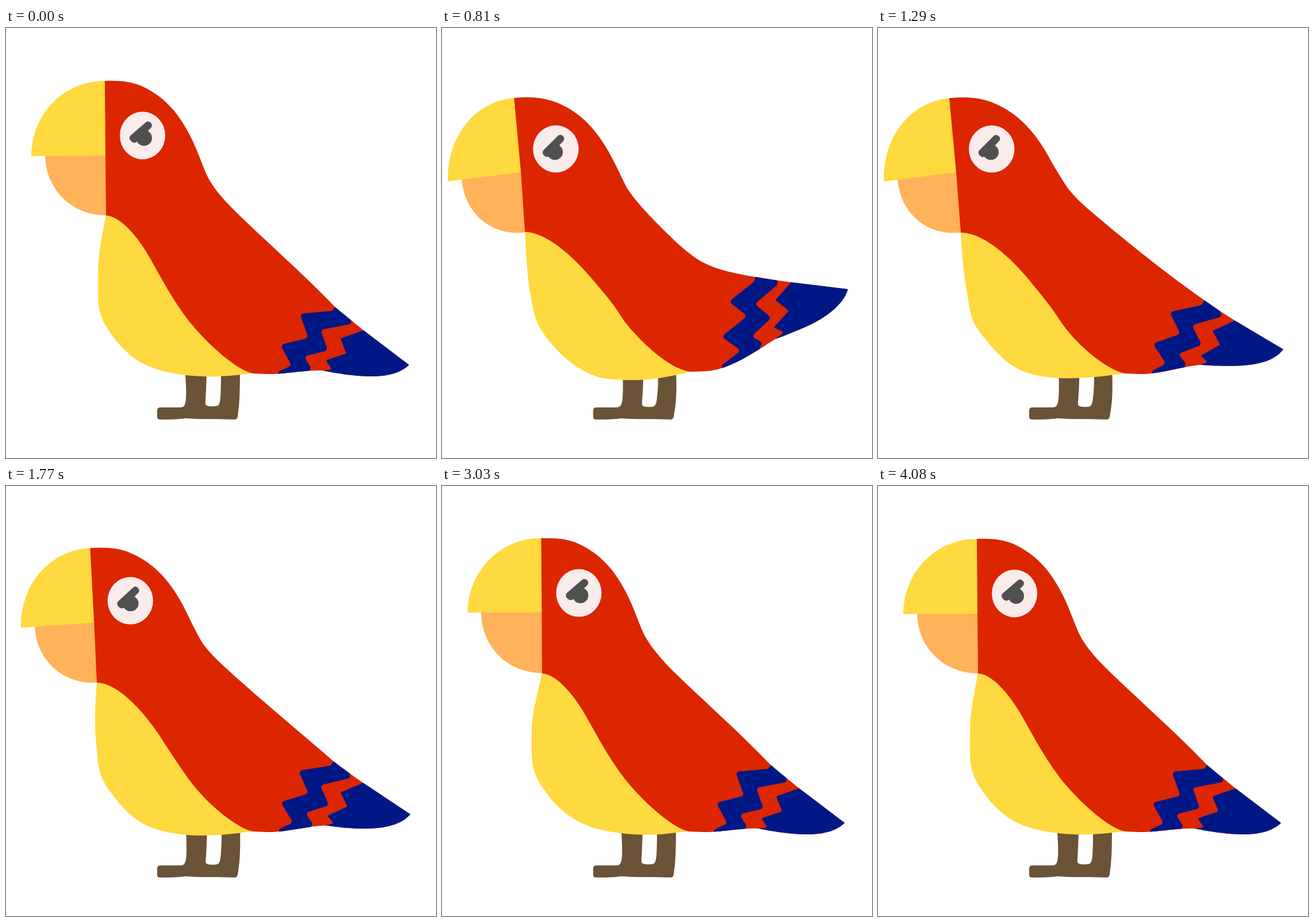
An HTML page with a canvas that plays this animation: 748x748 px, repeating every 4.8 s.

```html
<!DOCTYPE html>
<html lang="en">
<head>
<meta charset="utf-8">
<title>Parrot</title>
<style>
  html, body { margin: 0; width: 100%; height: 100%; overflow: hidden; background: #fff; }
  canvas { display: block; }
</style>
</head>
<body>
<canvas id="stage" width="748" height="748"></canvas>
<script>
const ctx = document.getElementById('stage').getContext('2d');
const LOOP = 4800, STEP = 30;
const BLUE = '#001885', YELLOW = '#ffd940', GREY = '#505050';

// Poses of each part: rest, crouch (head down), wag (head down, tail up), breath.
const legs = {
  color: '#6b5338',
  rest: 'M311,590 C313,615 314,635 313,645 C312,656 310,660 303,660 L268,660 Q263,660 263,666 L263,677 Q263,681 268,681 C285,681 295,681 312,679 C335,681 370,680 398,681 Q402,681 403,676 C406,655 407,640 407,590 L374,590 C374,610 374,630 373,643 C372,654 370,658 364,658 Q347,659 347,654 C347,645 349,620 349,590 Z',
  crouch: 'M314,590 C315,615 315,635 314,645 C313,656 310,660 303,660 L268,660 Q263,660 263,666 L263,677 Q263,681 268,681 C285,681 295,681 312,679 C335,681 370,680 398,681 Q402,681 403,676 C407,655 409,640 407,590 L376,590 C376,610 376,630 374,643 C373,654 371,659 365,659 Q348,660 348,655 C348,645 351,620 350,590 Z'
};
const belly = {
  color: YELLOW,
  rest: 'M174,326 C166,365 160,395 160,430 L160,460 C160,490 165,505 178,525 C205,567 237,590 283,599 C310,605 340,607 370,606 C395,605 415,602 435,600 L400,450 L200,300 Z',
  crouch: 'M144,356 C146,390 148,420 153,450 L158,480 C162,510 172,524 190,545 C220,582 240,595 271,603 C297,609 320,610 345,609 C380,608 405,604 435,600 L400,450 L180,330 Z',
  wag: 'M144,355 C146,390 148,430 153,460 L157,482 C162,512 172,527 190,549 C216,580 245,600 275,608 C300,613 325,613 350,612 C380,610 407,604 437,597 L400,450 L180,330 Z',
  breath: 'M174,325 C165,365 153,395 153,430 L153,460 C153,490 160,505 173,525 C200,564 235,590 283,600 C310,605 340,608 370,607 C395,605 415,602 435,600 L400,450 L200,300 Z'
};
const jaw = {
  color: '#ffb259',
  rest: 'M68,220 C68,281 115,326 174,326 L176,322 L175,220 Z',
  crouch: 'M34,262 C38,322 85,362 143,356 L146,352 L138,248 Z',
  breath: 'M68,217 C68,280 115,325 174,325 L176,320 L175,216 Z'
};
const beak = {
  color: YELLOW,
  rest: 'M174,92 L172,92 C100,92 44,150 44,223 L175,222 Z',
  crouch: 'M126,122 L124,122 C60,128 8,185 10,267 L138,251 Z',
  breath: 'M175,90 L173,90 C101,90 46,147 45,218 L176,218 Z'
};
const body = {
  color: '#dc2600',
  rest: 'M172,92 C200,91 222,94 238,102 C272,118 300,144 325,197 C340,230 345,250 356,268 C366,284 376,296 394,314 C440,360 520,430 572,485 C590,500 606,513 622,526 L701,586 C690,597 670,606 637,606 C610,606 575,601 552,596 C525,594 480,603 455,602 L430,601 C405,597 355,555 320,512 C290,473 270,435 252,403 C235,372 203,328 174,326 L173,222 Z',
  crouch: 'M124,122 C152,119 175,121 195,128 C235,143 265,170 292,215 C308,244 320,264 332,281 C350,304 378,325 400,344 C470,402 520,440 567,473 C585,486 603,498 621,509 L705,559 C694,574 670,588 613,588 C595,588 575,587 560,586 C530,589 485,603 455,602 L430,601 C405,597 352,560 318,511 C305,490 288,469 274,452 C245,414 190,356 144,356 L136,251 Z',
  wag: 'M125,122 C153,119 175,121 197,129 C236,144 264,171 289,214 C305,243 313,262 322,279 C338,304 373,340 412,377 C445,405 460,419 545,433 C566,436 587,440 607,442 L706,454 C700,480 665,508 620,525 C604,531 592,537 580,541 C545,563 500,595 460,597 L435,598 C405,597 358,560 322,516 C308,498 303,485 274,452 C245,416 190,356 144,355 L137,251 Z'
};
const stripe = {
  color: BLUE, corner: 5,
  rest: '574,482 568,492 511,497 526,539 477,551 497,587 455,606 520,606 531,592 518,571 560,561 547,525 601,515 599,500',
  crouch: '569,470 563,482 507,494 526,532 478,549 501,584 462,604 525,606 536,584 522,567 563,551 546,517 598,502 594,488',
  wag: '546,428 543,441 499,476 531,501 486,537 520,561 475,596 535,590 558,547 538,537 573,504 544,480 583,447 584,434'
};
const tip = {
  color: BLUE, corner: 2,
  rest: '630,523 582,540 592,566 556,578 567,594 548,596 560,620 720,620 720,570',
  crouch: '626,506 582,527 595,551 561,570 573,581 556,588 570,610 725,600 720,550',
  wag: '609,440 580,473 603,492 577,521 595,529 576,544 600,570 730,530 725,445'
};
// Ovals are given by their bounding box.
const eye = { color: '#fbecec', oval: true, rest: '198,145.5 277,228.5', crouch: '158,169.5 237.5,251.5' };
const pupil = { color: GREY, oval: true, rest: '226.5,177.5 254,205', crouch: '182.5,202.5 210,229.5' };
const lid = {
  color: GREY, corner: 6,
  rest: '248,160 256,170 223,202 212,191',
  crouch: '206,183 214,193 183,227 172,217'
};
const parts = [legs, belly, jaw, beak, body, stripe, tip, eye, pupil, lid];

const numbers = s => s.match(/[\d.]+/g).map(Number);

// Default breath: the head lifts a little, the tail pulls in.
const inhale = rest => rest.map((v, i) => {
  if (i % 2) return v < 300 ? v - 1.7 : v;
  const y = rest[i + 1];
  return y < 300 ? v + 1 : v > 480 ? v - 1 : v;
});

for (const p of parts) {
  p.template = p.rest.split(/[\d.]+/);
  const breath = p.breath && numbers(p.breath);
  p.rest = numbers(p.rest);
  p.crouch = numbers(p.crouch);
  p.wag = p.wag ? numbers(p.wag) : p.crouch;
  p.breath = breath || inhale(p.rest);
}

function pose(p, { crouch, wag, breath }) {
  const arc = 20 * wag * (1 - wag);
  return p.rest.map((v, i) => {
    const n = v + crouch * (p.crouch[i] - v) + wag * (p.wag[i] - p.crouch[i]) + breath * (p.breath[i] - v);
    return i % 2 ? n : n + arc * Math.max(0, (n - 450) / 250);
  });
}

function outline(p, v) {
  if (!p.oval && !p.corner) return new Path2D(p.template.map((s, i) => s + (v[i] ?? '')).join(''));
  const path = new Path2D();
  if (p.oval) {
    const [x0, y0, x1, y1] = v;
    path.ellipse((x0 + x1) / 2, (y0 + y1) / 2, (x1 - x0) / 2, (y1 - y0) / 2, 0, 0, 7);
    return path;
  }
  const n = v.length;
  path.moveTo((v[0] + v[n - 2]) / 2, (v[1] + v[n - 1]) / 2);
  for (let i = 0; i < n; i += 2) path.arcTo(v[i], v[i + 1], v[(i + 2) % n], v[(i + 3) % n], p.corner);
  path.closePath();
  return path;
}

function motion(t) {
  const ease = (from, to) => {
    const u = Math.min(1, Math.max(0, (t - from) / (to - from)));
    return (1 - Math.cos(Math.PI * u)) / 2;
  };
  const swing = (from, peak, to) => ease(from, peak) - ease(peak, to);
  return {
    crouch: ease(270, 840) - ease(1550, 2010),
    wag: swing(270, 800, 1290) + 0.35 * swing(1290, 1520, 1790),
    breath: swing(2640, 3360, 4080)
  };
}

function draw(now) {
  const state = motion(Math.floor(now % LOOP / STEP) * STEP);
  ctx.fillStyle = '#fff';
  ctx.fillRect(0, 0, 748, 748);
  const silhouette = outline(body, pose(body, state));
  for (const p of parts) {
    ctx.save();
    if (p.color === BLUE) ctx.clip(silhouette);
    ctx.fillStyle = p.color;
    ctx.fill(p === body ? silhouette : outline(p, pose(p, state)));
    ctx.restore();
  }
}

const start = performance.now();
function tick() {
  draw(performance.now() - start);
  requestAnimationFrame(tick);
}
tick();
</script>
</body>
</html>
```
